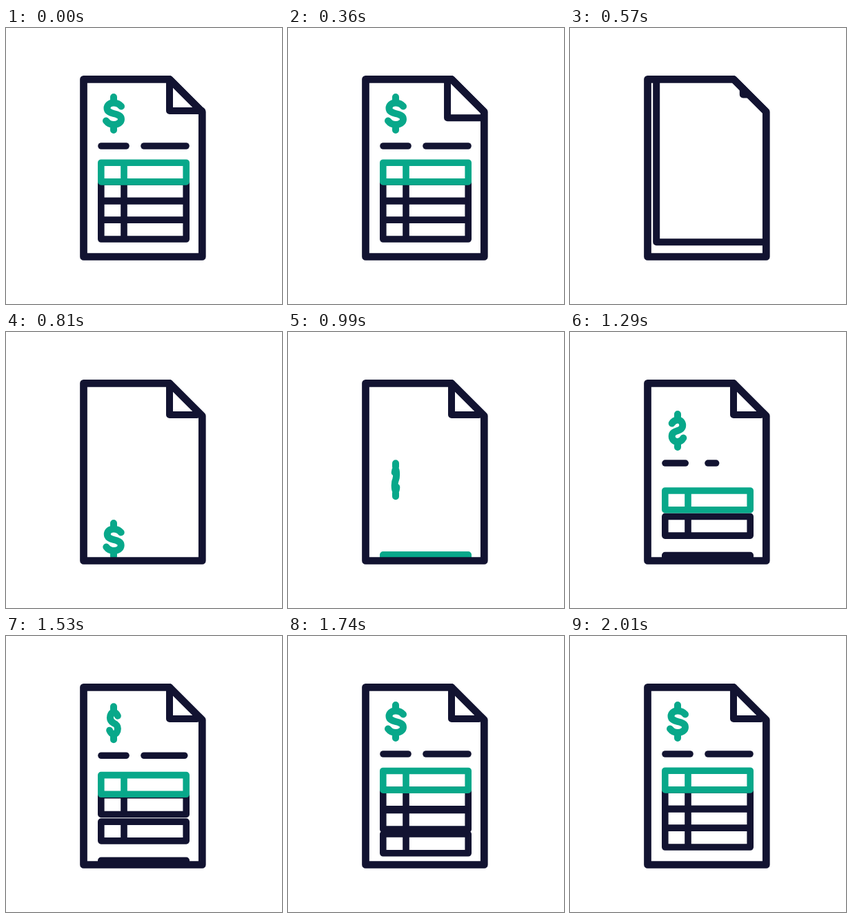
Animation, 400 px wide and 400 px high, one loop 2.1 s. Source, as an HTML page:

```html
<!DOCTYPE html>
<html lang="en">
<head>
<meta charset="utf-8">
<title>Invoice</title>
<style>
  html, body { margin: 0; width: 100%; height: 100%; overflow: hidden; background: #fff; }
  svg { display: block; }
  path { vector-effect: non-scaling-stroke; }
</style>
</head>
<body>
<svg width="400" height="400" viewBox="0 0 400 400" fill="none" stroke="#121331"
     stroke-width="10" stroke-linecap="round" stroke-linejoin="round">
  <clipPath id="inside"><path d="M108 69H290V329H108Z"/></clipPath>
  <g clip-path="url(#inside)">
    <g id="rows" stroke-width="9.6"></g>
    <path id="dashA" stroke-width="9.6"/>
    <path id="dashB" stroke-width="9.6"/>
    <path id="dollar" stroke="#08a88a" d="M0-24V-19M0 19V24M11-10.500C8-14 4-15.500 0-15.500C-6-15.500-9.500-12-9.500-7.800C-9.500-3-5-1.500 0 0C6 1.500 11 3 11 8C11 13 6 16 0 16C-5 16-8 14.500-11 10.500"/>
  </g>
  <path id="flap" fill="#fff"/>
  <path id="ear"/>
  <path stroke-width="10.7" d="M112.500 74.300H237L284.300 121.500V331.500H112.500Z"/>
</svg>
<script>
const LOOP = 2100, STEP = 30;
const $ = id => document.getElementById(id);
const clamp = x => Math.min(1, Math.max(0, x));
const span = (t, from, to) => clamp((t - from) / (to - from));
const easeOut = (p, n) => 1 - (1 - p) ** n;
const easeSine = p => (1 - Math.cos(Math.PI * p)) / 2;
const mix = (a, b, p) => a.map((v, i) => v + (b[i] - v) * p);
const line = points => 'M' + points.map(v => v.toFixed(2)).join(' ');

// Distance left to travel: passes through dist at time at, reaches zero at end.
const settle = (t, dist, at, end, n) => dist * (Math.max(0, end - t) / (end - at)) ** n;

// A folded corner: top end, corner, right end.
const earStart = [254, 91, 254, 91, 254, 91];
const earEnd = [237, 74, 237, 120, 277, 120];
const pageCorner = [113, 74, 113, 331, 278, 331];

// Each row: resting top, then the settle parameters.
const rows = [
  [278.3, 47, 1530, 1995, 2.8],
  [250.6, 73, 1290, 1900, 2.74],
  [222.9, 44.5, 1290, 1850, 3.1],
  [195.2, 34.8, 1290, 1850, 3.03]
].map(([top, ...motion], i) => {
  const el = document.createElementNS('http://www.w3.org/2000/svg', 'path');
  el.setAttribute('d', 'M137.800 0H261.200V27.700H137.800ZM171 0V27.700');
  if (i === 3) el.setAttribute('stroke', '#08a88a');
  $('rows').append(el);
  return { el, top, motion };
});

function dash(id, x, width, y, p) {
  $(id).setAttribute('d', p > 0 ? line([x, y, x + width * p, y]) : '');
}

// The old corner sweeps across the whole sheet, then a new one folds over.
function drawFolds(t) {
  const sweep = easeSine(span(t, 315, 635));
  const fold = easeOut(span(t, 550, 750), 2);
  const flap = mix(earEnd, pageCorner, sweep);
  $('flap').setAttribute('d', line([...flap, 284, flap[5], 284, 121, 237, 74]) + 'Z');
  $('flap').style.display = t < 640 ? '' : 'none';
  $('ear').setAttribute('d', fold > 0 ? line(mix(earStart, earEnd, fold)) : '');
}

function drawContent(t) {
  const lift = settle(t, 177, 810, 1800, 3.36);
  const turn = 1 - 2 * easeSine(span(t, 780, 1170)) + 2 * easeSine(span(t, 1170, 1700));
  $('dollar').setAttribute('transform', `translate(156 ${124 + lift}) scale(${turn || 0.001} 1)`);
  dash('dashA', 138, 36, 171 + lift, easeOut(span(t, 1110, 1480), 2.5));
  dash('dashB', 200, 61, 171 + lift, easeOut(span(t, 1260, 1630), 2.5));

  for (const { el, top, motion } of rows)
    el.setAttribute('transform', `translate(0 ${top + settle(t, ...motion)})`);
}

function draw(t) {
  drawFolds(t);
  drawContent(t < 640 ? LOOP : t); // the old content stays until it is covered
}

const start = performance.now();
function tick() {
  const t = (performance.now() - start) % LOOP;
  draw(Math.floor(t / STEP) * STEP);
  requestAnimationFrame(tick);
}
tick();
</script>
</body>
</html>
```
